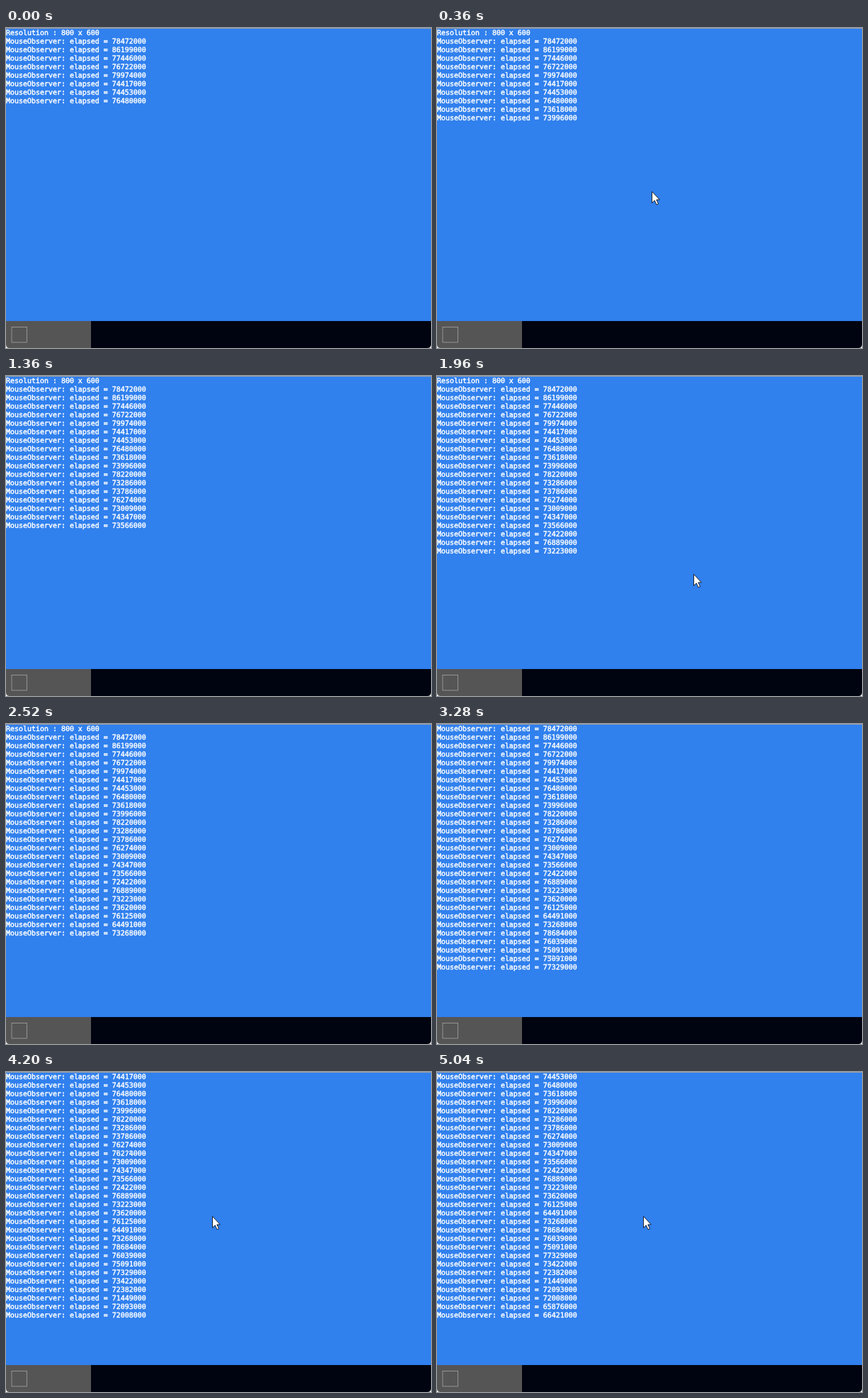
Recreate the animation shown at these times as an HTML page. Size 600 by 451 pixels, loop 5.08 s.

```html
<!DOCTYPE html>
<html lang="en">
<head>
<meta charset="utf-8">
<title>Mouse observer</title>
<style>
  html, body { margin: 0; width: 100%; height: 100%; overflow: hidden; background: #3080ee; }
  svg { display: block; width: 600px; height: 451px; }
  text {
    font: 9.966px "DejaVu Sans Mono", monospace;
    fill: #fff;
    stroke: #fff;
    stroke-width: .45px;
    white-space: pre;
    text-rendering: geometricPrecision;
  }
</style>
</head>
<body>
<svg viewBox="0 0 600 451">
  <defs>
    <clipPath id="above"><rect id="aboveBox" width="600" height="413"/></clipPath>
    <clipPath id="below"><rect id="belowBox" width="600" height="413"/></clipPath>
  </defs>
  <rect width="600" height="451" fill="#3080ee"/>
  <rect width="600" height="1" fill="#9a9fa8"/>
  <g id="fresh" clip-path="url(#above)"></g>
  <g id="stale" clip-path="url(#below)"></g>
  <rect y="413" width="600" height="38" fill="#000410"/>
  <rect y="413" width="120" height="38" fill="#555"/>
  <rect x="8" y="421.5" width="21.5" height="21.5" fill="none" stroke="#a4a4a4" stroke-width=".8"/>
  <path d="M0 446Q0 451 5 451H0ZM600 446Q600 451 595 451H600Z" fill="#fff"/>
  <path id="cursor" d="M.5 .5V16.5L4.2 13L6.9 18.9L9.5 17.8L6.8 12H11.3Z"
        fill="#fff" stroke="#111" stroke-width=".9" stroke-linejoin="round"/>
</svg>
<script>
const LOOP = 5080, ROWS = 29, ROW_H = 12, FIRST = 8;
const SCROLL = 80, SCROLL_H = 346;
const SHOW = 90, HIDE = 150;
const REST = 4155, MEET = 1930, TURN = 1200;

// the printed log, in thousands
const log = [
  78472, 86199, 77446, 76722, 79974, 74417, 74453, 76480, 73618, 73996, 78220, 73286,
  73786, 76274, 73009, 74347, 73566, 72422, 76889, 73223, 73620, 76125, 64491, 73268,
  78684, 76039, 75091, 77329, 73422, 72382, 71449, 72093, 72008, 65876, 66421
];
const last = log.length;
const lines = ["Resolution : 800 x 600", ...log.map(n => `MouseObserver: elapsed = ${n}000`)];

const byId = id => document.getElementById(id);
const cursor = byId("cursor");

function addRows(id) {
  return Array.from({ length: ROWS }, (_, i) => {
    const el = document.createElementNS("http://www.w3.org/2000/svg", "text");
    el.setAttribute("y", 10 + i * ROW_H);
    byId(id).append(el);
    return el;
  });
}
const fresh = addRows("fresh"), stale = addRows("stale");

// lines come more slowly once each one scrolls the screen
function printTime(n) {
  if (n > last) return Infinity;
  return n < ROWS ? 80 + 160 * (n - FIRST - 1) : 3285 + 194 * (n - ROWS);
}

// one sweep out and back, with smaller circles on top
function pointAt(t) {
  const sweep = Math.sin(Math.PI * Math.min(t / REST, 1));
  const a = 2 * Math.PI * (t - MEET) / TURN;
  return [
    291 + sweep * (71.5 + 28 * Math.sin(a)),
    203 + sweep * (76.5 + 22 * (1 - Math.cos(a)))
  ].map(Math.round);
}

function fill(rows, base, count) {
  rows.forEach((el, i) => {
    const s = base + i <= count ? lines[base + i] : "";
    if (el.textContent !== s) el.textContent = s;
  });
}

function draw(t) {
  let count = FIRST;
  while (printTime(count + 1) <= t) count++;
  const base = Math.max(0, count + 1 - ROWS);
  const start = printTime(count + 1) - SCROLL;
  const scrolling = count + 1 >= ROWS && t >= start;

  // the scroll copies the screen upwards from top to bottom
  const edge = scrolling ? (t - start) / SCROLL * SCROLL_H : 0;
  fill(fresh, base + 1, count);
  fill(stale, base, count);
  byId("aboveBox").setAttribute("height", edge);
  byId("belowBox").setAttribute("y", edge);

  // the pointer is wiped while each line is handled
  const phase = t - printTime(count);
  const idle = count === last;
  const visible = idle || (count > FIRST && phase >= SHOW && phase < HIDE);
  cursor.style.display = visible ? "" : "none";
  const [x, y] = pointAt(idle ? t : t - phase + SHOW);
  cursor.setAttribute("transform", `translate(${x} ${y})`);
}

const begin = performance.now();
function tick() {
  draw((performance.now() - begin) % LOOP);
  requestAnimationFrame(tick);
}
tick();
</script>
</body>
</html>
```
